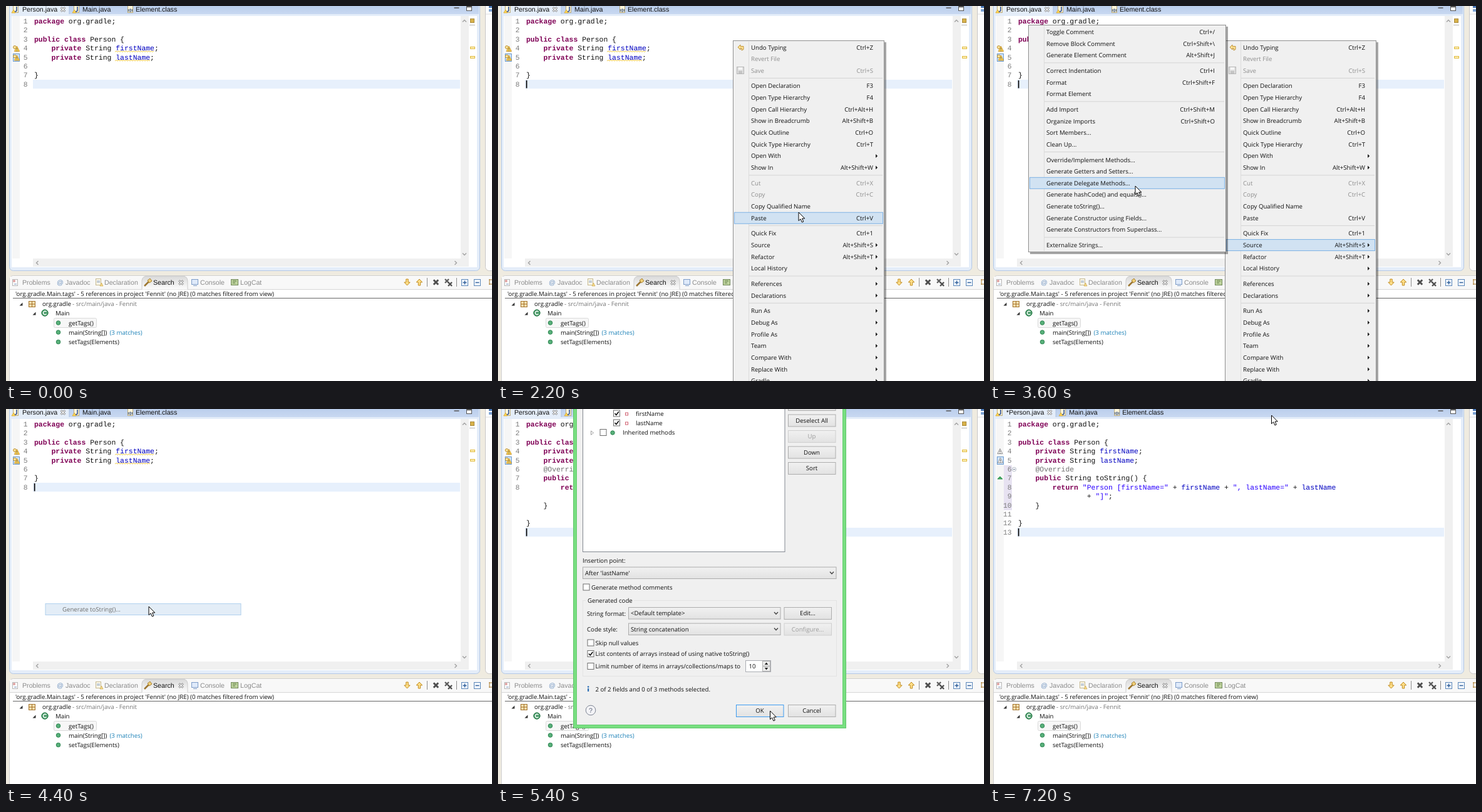
An HTML page for the animation above (7.4 s loop, 776 by 600 pixels).

```html
<!DOCTYPE html>
<html lang="en">
<head>
<meta charset="utf-8">
<title>Generate toString()</title>
<style>
  html, body { margin: 0; width: 100%; height: 100%; overflow: hidden; background: #efebe0; }
  svg { position: absolute; left: 0; top: 0; transform-origin: 0 0; }
  text { font: 9.63px "Open Sans", "Noto Sans", sans-serif; white-space: pre; text-rendering: geometricPrecision; }
  .tab { font: 10.65px "Liberation Sans", Arial, sans-serif; }
  .tree { font-size: 9.7px; }
  .code { font: 11.43px "Liberation Mono", "Courier New", monospace; }
  .kw { fill: #7f0055; font-weight: bold; }
  .str { fill: #2a00ff; }
  .field { fill: #0000c0; }
  .note { fill: #707070; }
  .idle .bar { fill: #f9f9f9; }
  .idle .edge { stroke: #dcdcdc; }
  .idle .ring { fill: #fdfdfd; stroke: #d2d2d2; }
</style>
</head>
<body>
<script>
const STEP = 200, LOOP = 7400, W = 776, H = 600;
const CHAR = 6.857, LINE = 14.4, ROW = 18.66, GAP = 6;

// Markup helpers
const esc = s => s.replace(/&/g, '&amp;').replace(/</g, '&lt;');
const rect = (x, y, w, h, fill, more = '') =>
  `<rect x="${x}" y="${y}" width="${w}" height="${h}" fill="${fill}" ${more}/>`;
const box = (x, y, w, h, fill, stroke, r = 0, cls = '') =>
  rect(x + .5, y + .5, w - 1, h - 1, fill, `stroke="${stroke}" rx="${r}" class="${cls}"`);
const path = (d, stroke, fill = 'none', w = 1, cls = '') =>
  `<path d="${d}" fill="${fill}" stroke="${stroke}" stroke-width="${w}" class="${cls}"/>`;
const dot = (x, y, r, fill, stroke = 'none') =>
  `<circle cx="${x}" cy="${y}" r="${r}" fill="${fill}" stroke="${stroke}"/>`;
const text = (x, y, s, fill = '#111', cls = '', anchor = 'start') =>
  `<text x="${x}" y="${y}" fill="${fill}" class="${cls}" text-anchor="${anchor}">${esc(s)}</text>`;
const group = (id, body) => `<g id="${id}">${body}</g>`;
const baseline = row => 28 + LINE * (row - 1);

// Java source
function highlight(s) {
  const rule = /(".*?")|(@\w+)|\b(package|public|class|private|return)\b|\b(firstName|lastName)\b/g;
  return esc(s).replace(rule, (m, str, note, kw) =>
    `<tspan class="${str ? 'str' : note ? 'note' : kw ? 'kw' : 'field'}">${m}</tspan>`);
}
function codeLine(row, s) {
  const indent = s.search(/\S/);
  return `<text class="code" fill="#111" x="${45 + indent * CHAR}" y="${baseline(row)}">${highlight(s.trim())}</text>`;
}
const codeLines = (first, lines) => lines.map((s, i) => s && codeLine(first + i, s)).join('');
const numbers = (from, to) => {
  let out = '';
  for (let n = from; n <= to; n++) out += text(34.6, baseline(n), String(n), '#7d7d7d', 'code', 'end');
  return out;
};
const squiggle = (x, y, w) => {
  let d = `M${x} ${y}`;
  for (let i = 0; i < w / 2; i++) d += `l2 ${i % 2 ? 1.6 : -1.6}`;
  return path(d, '#eec12c', 'none', .9);
};
const head = ['package org.gradle;', '', 'public class Person {',
  '    private String firstName;', '    private String lastName;'];
const added = ['    @Override', '    public String toString() {',
  '        return "Person [firstName=" + firstName + ", lastName=" + lastName',
  '                + "]";', '    }', '', '}'];

// Icons
const page = (x, y) => box(x - 4, y - 6, 9, 12, '#fdf6dc', '#b9a878');
const javaIcon = x => page(x, 5) + path(`M${x + 2} 1v6q-.5 2.5-4 1.5`, '#3a5a9b', 'none', 1.7) +
  path(`M${x - 6} 11l3-5l3 5z`, '#d9a21b', '#ffd75a', .7);
const classIcon = x => page(x, 5) + path(`M${x - 2.5} 5v4m2-4h2v4h-2zm4 0v4`, '#33507f', 'none', .9);
const cross = (x, y, r, c, w) => path(`M${x - r} ${y - r}l${2 * r} ${2 * r}m0 ${-2 * r}l${-2 * r} ${2 * r}`, c, 'none', w);
const closeIcon = (x, y) => cross(x, y, 3.2, '#6f6f6f', 3) + cross(x, y, 3, '#fff', 1.3);
const chevron = (x, y, dx, dy) => dx
  ? path(`M${x - dx} ${y - 3}l${2 * dx} 3l${-2 * dx} 3`, '#a2a2a2', 'none', 1.4)
  : path(`M${x - 3} ${y - dy}l3 ${2 * dy}l3 ${-2 * dy}`, '#a2a2a2', 'none', 1.4);
const triangle = (x, y, fill, stroke) => path(`M${x - 4} ${y + 3.5}l4-8l4 8z`, stroke, fill, .9) +
  path(`M${x} ${y - 1.5}v2.5m0 1v1`, '#555');
const foldOpen = (x, y) => path(`M${x + 2.5} ${y - 2.5}v5h-5z`, 'none', '#333');
const arrow = (x, y, d) => path(`M${x - 1.7} ${y - 5 * d}h3.4v${5 * d}h3l-4.7 ${5 * d}l-4.7 ${-5 * d}h3z`, '#c08a1e', '#ffe08a');

function tabs(name, shift) {
  const edge = 101 + shift;
  return rect(edge, -2, 755 - edge, 15, 'url(#bar)', 'class="bar"') + path(`M${edge} 0v13`, '#a9bfe0', 'none', 1, 'edge') +
    javaIcon(15) + text(26, 9, name, '#111', 'tab') + closeIcon(91 + shift, 5.5) +
    javaIcon(112 + shift) + text(122 + shift, 9, 'Main.java', '#111', 'tab') +
    classIcon(198 + shift) + text(207 + shift, 9, 'Element.class', '#111', 'tab');
}

function frameArt() {
  return `<defs>
    <linearGradient id="bar" x2="0" y2="1"><stop stop-color="#b9cdec"/><stop offset="1" stop-color="#c8d8f1"/></linearGradient>
    <linearGradient id="on" x2="0" y2="1"><stop stop-color="#d9d9d9"/><stop offset="1" stop-color="#fdfdfd"/></linearGradient>
    <linearGradient id="btn" x2="0" y2="1"><stop stop-color="#f1f1f1"/><stop offset="1" stop-color="#e2e2e2"/></linearGradient>
    </defs>` +
    rect(0, 0, W, H, '#efebe0') +
    box(5, -12, 752, 436, '#e4edf9', '#b3c8e6', 6, 'ring') +
    box(765, -12, 40, 436, '#fdfdfd', '#c9c9c9', 6) +
    rect(771, 0, 5, 3, '#4a77b5') + rect(771, 5, 5, 4, '#7ea4d4') + path('M766 13h10', '#ddd') +
    rect(9, 16, 743, 402, '#fff') + rect(10, 16, 12, 388, '#f6f6f6') +
    rect(726, 16, 13, 388, '#f0f0f0') + rect(43, 404, 696, 13, '#f0f0f0') +
    chevron(732, 24, 0, -1.5) + chevron(732, 397, 0, 1.5) +
    chevron(50, 411, -1.5, 0) + chevron(718, 411, 1.5, 0);
}

function bottomPane() {
  const label = (x, s) => text(x, 446, s, '#8b8b8b', 'tab');
  const square = (x, plus) => box(x - 5, 437, 11, 11, '#f4f9ff', '#5b86b8') +
    path(`M${x - 2.5} 442.5h6` + (plus ? 'm-3-3v6' : ''), '#2d5c97', 'none', 1.4);
  const method = (y, s) => dot(83.5, y, 3.3, '#58b07a', '#2c8450') + text(100, y + 3.5, s, '#111', 'tree');
  return box(5, 431, 790, 190, '#fff', '#cfcfcf', 6) + rect(6, 433, 770, 20, '#f8f8f8') +
    path('M6 453.5h770', '#d6d6d6') +
    path('M217 453.5V439q1-7 9-7h55q9 0 9 8v13.5', '#cccccc', 'url(#on)') +
    box(10, 437, 9, 11, '#fbfbfb', '#b7b7b7') + dot(13, 440, 2, '#e0a0a0') + rect(13, 444, 4, 2, '#b9c8de') + label(26, 'Problems') +
    text(81, 446, '@', '#6f93bf', 'tab') + label(95, 'Javadoc') +
    box(143, 436, 9, 11, '#fcf8ea', '#c5b88f') + path('M145 440h5m-5 2h5', '#8ca3c4') +
    path('M150 448l2.5-5l2.5 5z', '#d0aa4a', '#f4d98a', .7) + label(157, 'Declaration') +
    path('M221 448l7-7', '#9c7630', 'none', 2.5) + path('M226 439l4-3l3 4l-4 3z', '#a98331', '#f0cf78') +
    text(235, 446, 'Search', '#111', 'tab') + closeIcon(279.5, 442.5) +
    box(296, 437, 11, 9, '#dfeafa', '#7d9cc8') + path('M299 447.5h6', '#7d9cc8') + label(310, 'Console') +
    box(359, 437, 12, 10, '#bdd29c', '#71885a') + path('M362 440h6m-6 3h4', '#55703c') + label(374, 'LogCat') +
    arrow(640.5, 442, 1) + arrow(660, 442, -1) + path('M672.5 435v14M719.5 435v14', '#8d8d8d') +
    cross(686.5, 442, 3.7, '#4f4f4f', 3) + cross(704, 440, 3, '#5e5e5e', 2.4) + cross(709, 445, 3, '#4f4f4f', 2.4) +
    square(732, true) + square(752, false) + path('M771 438h5m-5 7h5m-4-8v9', '#a97a2a') +
    text(15, 464, "'org.gradle.Main.tags' - 5 references in project 'Fennit' (no JRE) (0 matches filtered from view)", '#111', 'tree') +
    path('M11 467.5h765', '#666') +
    foldOpen(24, 477) + box(36, 472, 11, 10, '#f6dfae', '#a4752e') + path('M41.5 472v10M36 477h11', '#a4752e') +
    text(58, 480, 'org.gradle', '#111', 'tree') + text(106, 480, '- src/main/java - Fennit', '#777', 'tree') +
    foldOpen(45, 492) + dot(62, 491, 5.2, '#4a9c6a', '#2c7a4a') + path('M64.5 489.3a2.8 2.8 0 1 0 0 3.4', '#fff', 'none', 1.4) +
    text(79, 495, 'Main', '#111', 'tree') +
    box(76, 499, 69, 16, '#f7f7f7', '#dadada', 2) + method(507, 'getTags()') + method(522, 'main(String[])') +
    text(165.5, 525.5, '(3 matches)', '#1f83b8', 'tree') + method(537.5, 'setTags(Elements)');
}

function rulerBefore() {
  const bulb = y => triangle(17.5, y + 1, '#ffd75a', '#c58c16') + dot(14, y - 2, 2.4, '#ffe9a0', '#b98c2f');
  return bulb(68) + box(11, 76, 11, 13, '#d3e6fa', '#6b9bd0') + bulb(82.5) +
    box(741, 20, 7, 7, '#d8b24a', '#a98a3c') + path('M740 30.5h9', '#b4b4b4') +
    box(741, 65, 8, 4, '#fff0b8', '#dfb93e') + box(741, 80, 8, 4, '#fff0b8', '#dfb93e') + numbers(1, 8);
}
function rulerAfter() {
  return rect(22, 90, 13, 72, '#e7e2f1') + triangle(16, 68, '#f4f4f4', '#8a8a8a') +
    box(11, 76, 11, 13, '#d3e6fa', '#6b9bd0') + triangle(16.5, 82.5, '#f4f4f4', '#8a8a8a') +
    path('M12 112l4-4l4 4z', '#2f9150', '#45ad63') + numbers(1, 13) +
    dot(38.5, 96.5, 3.2, '#fff', '#b0b8c4') + path('M36.8 96.5h3.4', '#6b7a90');
}

// Menus: "label|shortcut", '-' separator, leading '!' disabled, '>' submenu
const mainMenu = { x: 375, w: 242, y: 55, h: 560, label: 404, keys: 599, first: 66, items: (
  'Undo Typing|Ctrl+Z;!Revert File;!Save|Ctrl+S;-;Open Declaration|F3;Open Type Hierarchy|F4;' +
  'Open Call Hierarchy|Ctrl+Alt+H;Show in Breadcrumb|Alt+Shift+B;Quick Outline|Ctrl+O;' +
  'Quick Type Hierarchy|Ctrl+T;>Open With;>Show In|Alt+Shift+W;-;!Cut|Ctrl+X;!Copy|Ctrl+C;' +
  'Copy Qualified Name;Paste|Ctrl+V;-;Quick Fix|Ctrl+1;>Source|Alt+Shift+S;>Refactor|Alt+Shift+T;' +
  '>Local History;-;>References;>Declarations;-;>Run As;>Debug As;>Profile As;>Team;' +
  '>Compare With;>Replace With;>Gradle').split(';') };
const subMenu = { x: 61, w: 316, y: 30, h: 364, label: 90, keys: 359, first: 41.4, items: (
  'Toggle Comment|Ctrl+/;Remove Block Comment|Ctrl+Shift+\\;Generate Element Comment|Alt+Shift+J;-;' +
  'Correct Indentation|Ctrl+I;Format|Ctrl+Shift+F;Format Element;-;Add Import|Ctrl+Shift+M;' +
  'Organize Imports|Ctrl+Shift+O;Sort Members...;Clean Up...;-;Override/Implement Methods...;' +
  'Generate Getters and Setters...;Generate Delegate Methods...;Generate hashCode() and equals()...;' +
  'Generate toString()...;Generate Constructor using Fields...;Generate Constructors from Superclass...;-;' +
  'Externalize Strings...').split(';') };

function menuArt(id, m) {
  let y = m.first, out = '';
  m.rows = [];
  for (const item of m.items) {
    if (item === '-') {
      out += path(`M${m.label - 3} ${y - 6.5}H${m.x + m.w - 3}`, '#d4d4d4');
      y += GAP;
      continue;
    }
    const [name, keys] = item.replace(/^[!>]/, '').split('|');
    const fill = item[0] === '!' ? '#8e8e8e' : '#111';
    out += text(m.label, y + 3.5, name, fill);
    if (keys) out += text(m.keys, y + 3.5, keys, fill, '', 'end');
    if (item[0] === '>') out += path(`M${m.keys + 4} ${y - 3}l3.2 3l-3.2 3z`, 'none', '#222');
    m.rows.push({ name, y });
    y += ROW;
  }
  return group(id, rect(m.x + 3, m.y + 3, m.w, m.h, '#000', 'opacity=".35"') +
    box(m.x, m.y, m.w, m.h, '#f0f0f0', '#8f8f8f') +
    path(`M${m.label - 3.5} ${m.y + 2}v${m.h - 4}`, '#dcdcdc') +
    rect(m.x + 2.5, 0, m.w - 5, 18, '#d1e2f2', `id="${id}Hover" stroke="#7db1e4"`) + out +
    (id === 'main' ? path('M383 66l4-4v2.5h5v5l-3 1.5v-3.5h-2v2.5z', '#b8892b', '#ffe394', .9) +
      box(381, 97, 12, 12, '#dedede', '#b5b5b5') + rect(384, 98, 6, 4, '#f6f6f6') + rect(384, 104, 6, 4, '#c4c4c4') : ''));
}

function dialogArt() {
  const check = (x, y, on) => box(x - 5.5, y - 5.5, 11, 11, '#fff', '#6e6e6e') +
    (on ? path(`M${x - 3} ${y}l2.3 2.6l4-5.4`, '#111', 'none', 1.6) : '');
  const button = (x, y, s, fill = '#111', stroke = '#adadad') => box(x, y, 76.5, 20, 'url(#btn)', stroke) +
    text(x + 38, y + 13.3, s, fill, '', 'middle');
  const combo = (x, y, w, s) => box(x, y, w, 19.5, 'url(#btn)', '#acacac') + text(x + 4, y + 13.3, s) +
    path(`M${x + w - 10.5} ${y + 8}l3 3.2l3-3.2`, '#444', 'none', 1.4);
  const field = (y, s) => check(189.5, y, true) + box(203, y - 1.5, 5, 5, '#fff', '#d06070') + text(220, y + 3.5, s);
  return rect(120, -20, 436, 531, '#78df80') + path('M120.5 0V510.5H555.5V0', '#62c46c') +
    rect(126, -20, 424, 525, '#f0f0f0') + path('M125.5 0V505.5H550.5V0', '#68cb72') +
    box(135, -20, 323.5, 249, '#fff', '#828790') + field(7, 'firstName') + field(22, 'lastName') +
    path('M148.5 35l4 3.2l-4 3.2z', '#a0a0a0', '#fff') + check(168, 37.5) + dot(183, 38, 3.2, '#58b07a', '#2c8450') +
    text(199, 41, 'Inherited methods') +
    button(463, -17, '') + button(463, 8.5, 'Deselect All') + button(463, 34, 'Up', '#9c9c9c', '#cfcfcf') +
    button(463, 59.5, 'Down') + button(463, 85, 'Sort') +
    text(135, 246, 'Insertion point:') + combo(135, 252.5, 405.5, "After 'lastName'") +
    check(141, 285) + text(149, 289, 'Generate method comments') +
    box(135, 306, 406, 122, 'none', '#e3e3e3') + rect(140, 302, 77, 8, '#f0f0f0') + text(143, 309.5, 'Generated code') +
    text(142, 330.5, 'String format:') + combo(208, 317, 243.5, '<Default template>') + button(456.5, 317, 'Edit...') +
    text(142, 356, 'Code style:') + combo(208, 342.5, 243.5, 'String concatenation') +
    button(456.5, 342.5, 'Configure...', '#9c9c9c', '#cfcfcf') +
    check(148, 374) + text(155.5, 377.5, 'Skip null values') +
    check(148, 391.5, true) + text(155.5, 395, 'List contents of arrays instead of using native toString()') +
    check(148, 411.5) + text(155.5, 415, 'Limit number of items in arrays/collections/maps to') +
    box(395, 402, 41, 19, '#fff', '#abadb3') + text(400.5, 415, '10') +
    box(422, 403, 13, 8.5, '#eee', '#b0b0b0') + box(422, 411.5, 13, 8.5, '#eee', '#b0b0b0') +
    path('M425.7 409l2.8-3.4l2.8 3.4zm0 5l2.8 3.4l2.8-3.4z', 'none', '#222') +
    rect(143, 447, 2.2, 5, '#2f6fb5') + dot(144.1, 444.6, 1.3, '#2f6fb5') +
    text(155.5, 451.5, '2 of 2 fields and 0 of 3 methods selected.') +
    dot(148, 482, 7.8, '#f3f3f6', '#7e8594') + text(148, 486, '?', '#5a6478', 'tab', 'middle') +
    button(380, 473, 'OK', '#111', '#3c9bf0') + button(463, 473, 'Cancel');
}

const svg = (id, body) => `<svg id="${id}" width="${W}" height="${H}" viewBox="0 0 ${W} ${H}">${body}</svg>`;
document.body.innerHTML =
  svg('scene', frameArt() + group('tabsOld', tabs('Person.java', 0)) + group('tabsNew', tabs('*Person.java', 4.2)) +
    path('M715.5 3h8', '#555', 'none', 1.5) + box(735, 0, 9, 8, '#fff', '#555') + path('M735 1.5h9', '#555', 'none', 1.5) +
    rect(43, 118, 682, 14.2, '#e7f0fc', 'id="current"') +
    group('rulerOld', rulerBefore()) + group('rulerNew', rulerAfter()) +
    codeLines(1, head) + group('marks', squiggle(174, 73.5, 62) + squiggle(174, 88, 55)) +
    group('codeOld', codeLine(7, '}')) + group('codeNew', codeLines(6, added)) +
    rect(44.8, 119, 1.7, 12.5, '#000', 'id="caret"') + bottomPane() +
    menuArt('main', mainMenu) + menuArt('sub', subMenu) +
    group('fade', rect(63, 311.5, 312, 18, '#d1e2f2', 'stroke="#7db1e4"') + text(90, 324.2, 'Generate toString()...'))) +
  svg('dialog', dialogArt()) +
  svg('pointer', group('cursor', path('M0 0V13.6L3.1 10.8L5.4 16L7.8 15L5.6 10H9.8Z', '#000', '#fff')));

const $ = id => document.getElementById(id);
const alpha = (id, v) => { $(id).style.opacity = v; $(id).style.visibility = v ? 'visible' : 'hidden'; };

// Pointer track: [step, x, y]
const track = [[2, 776, 420], [5, 420, 160], [6, 375, 127], [9, 375, 127], [10, 400, 190], [11, 480, 330],
  [12, 513, 382], [14, 513, 382], [16, 330, 375], [18, 232, 288], [19, 230, 304], [20, 228, 316], [23, 228, 316],
  [24, 262, 350], [26, 425, 475], [27, 434.5, 483], [31, 434.5, 483], [32, 436, 460], [34, 444, 190], [36, 449.5, 10]];
function pointerAt(s) {
  const i = Math.max(1, track.findIndex(p => p[0] >= s));
  const [s0, x0, y0] = track[i - 1], [s1, x1, y1] = track[i];
  const k = (s - s0) / (s1 - s0);
  return [x0 + (x1 - x0) * k, y0 + (y1 - y0) * k];
}

function hover(id, m, x, y, keep) {
  const inside = x > m.x + 2 && x < m.x + m.w;
  const row = m.rows.find(r => keep ? r.name === keep : inside && Math.abs(r.y - y) <= ROW / 2);
  $(id + 'Hover').style.display = row ? '' : 'none';
  if (row) $(id + 'Hover').setAttribute('y', row.y - 9);
}

// The dialog tilts back while it opens
const TILT = 'matrix3d(1.009,0,0,0, .0257,1.0238,0,.000076, 0,0,1,0, 11.2,2.2,0,1.04)';

function draw(s) {
  const menuOn = s >= 8 && s < 22, subOn = s >= 12 && s < 22;
  const inserted = s >= 27, saved = s < 28;
  const [x, y] = pointerAt(s);

  alpha('cursor', +(s >= 2));
  $('cursor').setAttribute('transform', `translate(${x} ${y})`);

  alpha('main', menuOn ? (s === 8 ? .93 : 1) : 0);
  alpha('sub', +subOn);
  hover('main', mainMenu, x, y, subOn ? 'Source' : '');
  hover('sub', subMenu, x, y);
  alpha('fade', s === 22 ? .6 : s === 23 ? .17 : 0);

  alpha('dialog', s === 23 ? .7 : +(s > 23 && s < 28));
  $('dialog').style.transform = s === 23 ? TILT : 'none';
  $('scene').classList.toggle('idle', s >= 23 && s < 27);

  alpha('codeOld', +!inserted);
  alpha('codeNew', +inserted);
  for (const id of ['tabsOld', 'rulerOld', 'marks']) alpha(id, +saved);
  for (const id of ['tabsNew', 'rulerNew']) alpha(id, +!saved);

  const drop = inserted ? LINE * 5 : 0;
  $('current').setAttribute('y', 118 + drop);
  $('caret').setAttribute('y', 119 + drop);
  alpha('caret', +(menuOn || s % 5 === 1 || s % 5 === 2));
}

let last = -1;
const start = performance.now();
function tick() {
  const s = Math.floor((performance.now() - start) % LOOP / STEP);
  if (s !== last) draw(last = s);
  requestAnimationFrame(tick);
}
tick();
</script>
</body>
</html>
```
